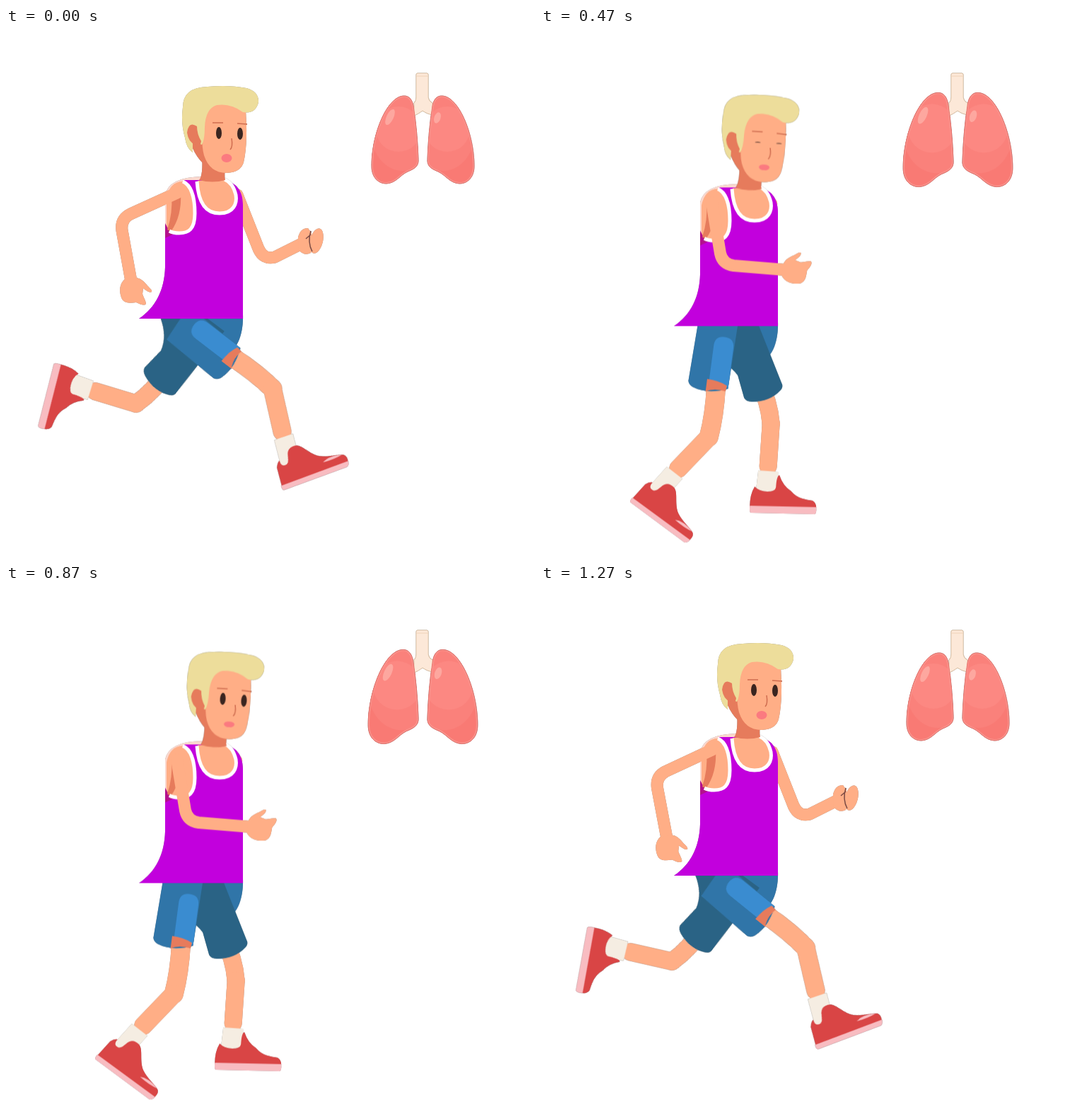
Recreate the animation shown at these times as an HTML page without scripts. Size 748 by 748 pixels, loop 1340 ms.

```html
<!DOCTYPE html>
<html lang="en">
<head>
<meta charset="utf-8">
<title>Runner and lungs</title>
<style>
  @property --bob { syntax: "<number>"; inherits: true; initial-value: 0; }
  @property --eye { syntax: "<number>"; inherits: true; initial-value: 1; }
  @property --arm { syntax: "<angle>"; inherits: true; initial-value: 0deg; }
  @property --far-arm { syntax: "<angle>"; inherits: true; initial-value: 0deg; }
  @property --thigh { syntax: "<angle>"; inherits: true; initial-value: 0deg; }
  @property --shin { syntax: "<angle>"; inherits: true; initial-value: 0deg; }
  @property --far-thigh { syntax: "<angle>"; inherits: true; initial-value: 0deg; }
  @property --far-shin { syntax: "<angle>"; inherits: true; initial-value: 0deg; }

  html, body { margin: 0; width: 100%; height: 100%; overflow: hidden; background: #fff; }
  svg {
    display: block; width: 100%; height: 100%;
    animation: run 1340ms step-end -10ms infinite, blink 1340ms step-end -10ms infinite;
  }

  /* The stride swings out and back, so each pose serves both directions. */
  @keyframes run {
    0%, 100% { --bob: 0; --arm: 0deg; --far-arm: 0deg; --thigh: -52.5deg; --shin: -14.6deg; --far-thigh: 37deg; --far-shin: 103deg; }
    5%, 95% { --bob: 0; --arm: -.5deg; --far-arm: 0deg; --thigh: -51deg; --shin: -15deg; --far-thigh: 36.3deg; --far-shin: 99deg; }
    10%, 90% { --bob: 2.5; --arm: -9deg; --far-arm: 6deg; --thigh: -42deg; --shin: -10.5deg; --far-thigh: 28deg; --far-shin: 79deg; }
    15%, 85% { --bob: 6; --arm: -19.5deg; --far-arm: 14deg; --thigh: -31deg; --shin: -4.6deg; --far-thigh: 18deg; --far-shin: 58deg; }
    20%, 80% { --bob: 13; --arm: -37deg; --far-arm: 27deg; --thigh: -17.3deg; --shin: 0deg; --far-thigh: 1deg; --far-shin: 34deg; }
    25%, 75% { --bob: 14; --arm: -50deg; --far-arm: 42deg; --thigh: -9deg; --shin: 14deg; --far-thigh: -7deg; --far-shin: 22deg; }
    30%, 70% { --bob: 13; --arm: -63deg; --far-arm: 57deg; --thigh: -1deg; --shin: 28deg; --far-thigh: -15deg; --far-shin: 10deg; }
    35%, 65% { --bob: 10.5; --arm: -75deg; --far-arm: 70deg; --thigh: 7.5deg; --shin: 42deg; --far-thigh: -22.7deg; --far-shin: 0deg; }
    40%, 60% { --bob: 6; --arm: -87deg; --far-arm: 86deg; --thigh: 16deg; --shin: 64deg; --far-thigh: -32deg; --far-shin: -4deg; }
    45%, 55% { --bob: 2; --arm: -98deg; --far-arm: 102deg; --thigh: 24.5deg; --shin: 87deg; --far-thigh: -41.5deg; --far-shin: -7.5deg; }
    50% { --bob: 0; --arm: -107deg; --far-arm: 109deg; --thigh: 36deg; --shin: 112deg; --far-thigh: -51deg; --far-shin: -14deg; }
  }
  @keyframes blink {
    0%, 45%, 100% { --eye: 1; }
    20%, 40% { --eye: .5; }
    25%, 30%, 35% { --eye: .06; }
  }

  .runner { transform: translateY(calc(var(--bob) * 1px)); }
  .runner, .lungs { filter: drop-shadow(0 0 .5px #0007); }
  .head {
    transform: translate(calc(var(--bob) * .18px), calc(var(--bob) * .12px)) rotate(calc(var(--bob) * .31deg));
    transform-origin: 290px 214px;
  }
  .eyes { transform: scaleY(var(--eye)); transform-origin: 316px 149px; }
  .mouth { transform: scaleY(calc(1 - var(--bob) * .03)); transform-origin: 312px 184px; }
  .lobe { transform: scale(calc(1 + var(--bob) * .007)); transform-origin: 596px 158px; }

  .arm { transform: rotate(var(--arm)); transform-origin: 244px 235px; }
  .far-arm { transform: rotate(var(--far-arm)); transform-origin: 325px 236px; }
  .thigh { transform: translate(257px, 418px) rotate(var(--thigh)); }
  .shin { transform: translateY(151px) rotate(calc(var(--shin) - var(--thigh))); }
  .far-thigh { transform: translate(270px, 417px) rotate(var(--far-thigh)); }
  .far-shin { transform: translateY(143px) rotate(calc(var(--far-shin) - var(--far-thigh))); }

  .skin { fill: #ffae86; }
  .shade { fill: #e67b5c; }
  .limb { fill: none; stroke: #ffae86; stroke-linecap: round; stroke-linejoin: round; }
  .line { fill: none; stroke: #cf6d50; stroke-width: 1.5; }
  .trim { fill: none; stroke: #fff; stroke-width: 5; }
  .pale { fill: #fbd8ce; }
  .shirt { fill: #c200dd; }
  .blue { fill: #3075a8; }
  .navy { fill: #2a6385; }
  .sky { fill: #3a8cd0; }
  .sock { fill: #f5ede2; }
  .shoe { fill: #d94545; }
  .sole { fill: #f8bcc1; }
</style>
</head>
<body>
<svg viewBox="0 0 748 748">
  <defs>
    <path id="lobe" d="M616 96C640 96 662 150 662 195C662 212 652 220 641 220C627 219 622 208 611 203C601 199 595 195 596 185C597 160 599 135 603 110C605 101 609 96 616 96Z"/>
    <clipPath id="inside"><use href="#lobe"/></clipPath>
    <g id="lung">
      <use href="#lobe" fill="#f97a74"/>
      <g clip-path="url(#inside)">
        <ellipse cx="618" cy="150" rx="44" ry="52" fill="#fa817b"/>
        <circle cx="624" cy="143" r="32" fill="#fc8882"/>
      </g>
      <use href="#lobe" fill="none" stroke="#f9948d" stroke-width="3.5" clip-path="url(#inside)"/>
      <use href="#lobe" fill="none" stroke="#e56c66" stroke-width=".8"/>
    </g>
  </defs>

  <g class="lungs">
    <path fill="#fce8d8" stroke="#e6c7a5" stroke-width=".8" d="M580 66Q580 64 582 64H595Q597 64 597 66V98Q598 104 603 106V122Q598 123 589 117Q582 122 577 124V106Q580 103 580 98Z"/>
    <path stroke="#efd3b8" d="M580 68H597"/>
    <g class="lobe">
      <use href="#lung"/>
      <ellipse cx="610" cy="127" rx="4.5" ry="8" fill="#fda79f" transform="rotate(18 610 127)"/>
    </g>
    <g transform="matrix(-1 0 0 1 1179 0)">
      <g class="lobe">
        <use href="#lung"/>
        <ellipse cx="636" cy="126" rx="5" ry="12" fill="#fda79f" transform="rotate(-25 636 126)"/>
      </g>
    </g>
  </g>

  <g class="runner">
    <g class="far-arm">
      <path class="limb" stroke-width="17" d="M327 236L357 312Q364 328 380 324L418 305"/>
      <path class="skin" d="M413 296Q416 283 427 283L432 290Q434 309 431 318Q422 323 414 314Z"/>
      <ellipse class="skin" cx="439" cy="301" rx="9" ry="18" transform="rotate(14 439 301)"/>
      <path class="line" style="stroke:#7a4a44" d="M431 287Q426 303 433 316M424 298L431 292"/>
    </g>

    <path class="blue" d="M224 405H335C336 430 328 455 313 459H228Q224 459 224 455Z"/>

    <g class="far-thigh">
      <path class="limb" stroke-width="25" d="M7 80Q10 112 0 143"/>
      <g class="far-shin">
        <path class="limb" stroke-width="25" d="M0 0L-4 60"/>
        <path class="sock" d="M-18 66L10 68V92Q-5 100 -21 92Z"/>
        <path class="shoe" d="M-30 118Q-30 100 -23 89Q-16 96 -5 96Q6 96 7 90Q8 73 12 73Q17 88 28 95C38 107 50 107 59 109Q64 112 64 119Z"/>
        <path class="sole" d="M-30 116L64 118Q65 128 61 128L-28 126Q-31 126 -30 116Z"/>
      </g>
      <path class="navy" d="M-36 -14L-46 25Q-22 40 -17 62L-21 95Q-20 101 -13 104Q10 114 30 105Q37 102 36 95L38 -14Z"/>
    </g>

    <g class="thigh">
      <path class="limb" stroke-width="27" d="M1 80Q4 120 0 151"/>
      <g class="shin">
        <path class="limb" stroke-width="26" d="M0 0L-2 62"/>
        <path class="sock" d="M-16 71L12 69V98L-3 100V112H-16Z"/>
        <path class="shoe" d="M-22 110Q-20 103 -16 101C-16 108 -13 110 -9 109C-4 108 -4 103 -3 98C-2 88 4 86 10 86C20 86 26 102 40 109C52 114 66 113 74 116Q79 120 77 128L-22 138Z"/>
        <path class="sole" d="M-23 136L78 126Q78 133 73 134L-20 143Q-23 143 -23 136ZM43 119Q52 112 72 115Q60 119 43 119Z"/>
      </g>
      <path class="blue" d="M-36 -10L-39 76Q-38 81 -32 84Q-10 92 18 80L20 -14Z"/>
      <path class="sky" d="M-10 74V22Q-10 8 4 8Q18 8 18 22V79Z"/>
      <path class="shade" d="M-13 70Q4 70 16 76L15 84Q-2 81 -13 88Z"/>
    </g>

    <path class="pale" d="M225 284V236Q230 211 277 210L274 220Z"/>
    <path class="shirt" d="M225 284L252 215H309C325 219 335 229 335 250V411H188C212 395 224 370 225 338Z"/>
    <path class="skin" d="M271 216C272 245 280 262 302 262C322 262 328 248 325 236C322 222 315 217 309 214Z"/>
    <path class="trim" d="M270 217C272 247 282 262 302 262C322 262 327 248 325 236C322 223 316 217 309 214"/>
    <path class="skin" d="M227 240Q232 217 250 217C262 222 267 240 267 262C267 285 258 291 245 291Q234 291 227 286Z"/>
    <path fill="#b3118c" d="M225 276Q231 290 240 290L225 297Z"/>
    <path class="shade" d="M234 236L247 233Q249 266 233 288L228 285Q236 262 234 236Z"/>
    <path class="trim" d="M250 217C262 222 267 240 267 262C267 285 258 290 245 290Q236 290 231 287"/>

    <g class="head">
      <path class="shade" d="M277 180L311 196Q308 207 310 215Q292 220 273 215Q279 208 277 180Z"/>
      <path class="shade" d="M262 140L264 170Q275 195 300 205V140Z"/>
      <path class="skin" d="M281 104H338Q343 160 336 190Q332 204 312 205Q288 205 280 180Q274 160 281 104Z"/>
      <path fill="#eddd9b" d="M250 112Q250 84 285 83Q315 80 340 85Q358 90 357 105Q353 122 335 119Q318 106 298 109Q282 114 281 140Q281 158 277 165L264 160V176Q255 170 253 155Q247 135 250 112Z"/>
      <path class="shade" d="M270 139Q258 131 256 148Q258 162 268 165Q274 172 276 160Q270 150 270 139Z"/>
      <path class="line" d="M292 134H307M327 135L341 136M319 156Q321 168 317 172"/>
      <g class="eyes" fill="#3a2520">
        <ellipse cx="301" cy="148.500" rx="4" ry="8.500"/>
        <ellipse cx="331" cy="149.500" rx="4" ry="8.500"/>
      </g>
      <ellipse class="mouth" cx="312" cy="184" rx="7.500" ry="6" fill="#fb7a80"/>
    </g>

    <g class="arm">
      <path class="limb" stroke-width="17" d="M242 233L176 263Q162 270 164 286L177 358"/>
      <path class="skin" d="M168 355C160 362 160 372 163 381C166 390 175 389 184 388C190 391 196 393 198 390C198 386 194 380 193 376L194 368C198 371 203 375 206 373C207 370 202 367 199 363C194 357 190 354 184 353Z"/>
    </g>
  </g>
</svg>
</body>
</html>
```
